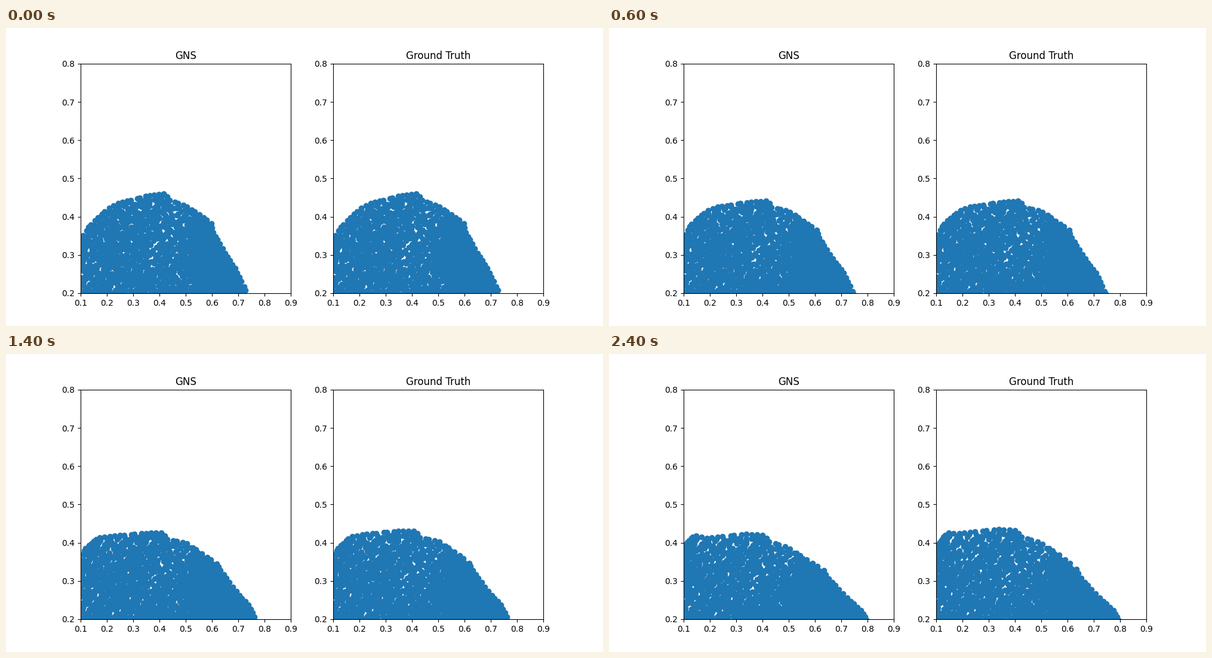
Animation of 1000x500 px, one loop 2.5 s. Source, as a matplotlib script:

```python
import numpy as np
import matplotlib.pyplot as plt
from matplotlib.animation import FuncAnimation
from matplotlib.collections import PolyCollection

BLUE = "#1f77b4"
FRAMES, STEP = 25, 100
FLOOR = 445
rng = np.random.default_rng(4)

# Key points of the surface, in stage pixels:
# x, y at rest, then total run, starting fall speed and total fall.
KEYS = np.array([
    (125, 355, -4, -4, -5),
    (140, 332, -14, -5, -11),
    (170, 303, -27, 21, 1),
    (189, 294, -24, 27, 15),
    (240, 281, -11, 51, 21),
    (268, 278, -7, 53, 26),
    (273, 289, -6, 53, 26),
    (301, 298, -1, 39, 27),
    (344, 327, 16, 50, 36),
    (346, 341, 20, 35, 34),
    (369, 381, 33, 43, 31),
    (384, 404, 39, 34, 27),
    (404, 446, 36, 34, 16)], float)


def key(x, col):
    return np.interp(x, KEYS[:, 0], KEYS[:, col])


def surface(gap=8, wobble=0.9):
    """Grains strung along the surface at nearly even distances."""
    seg = np.hypot(np.diff(KEYS[:, 0]), np.diff(KEYS[:, 1]))
    dist = np.append(0, np.cumsum(seg))
    s = np.arange(0, dist[-1], gap)
    s = np.sort(s + rng.normal(0, wobble, s.size))
    x = np.interp(s, dist, KEYS[:, 0])
    return np.column_stack([x, np.interp(s, dist, KEYS[:, 1])])


def filling(pitch=7):
    """Shaken hexagonal packing, looser along a slanted fault."""
    rows = np.arange(270, FLOOR + 12, pitch * np.sqrt(3) / 2)
    cols = np.arange(118, 318, pitch)
    x, y = np.meshgrid(cols, rows)
    x = x + (np.arange(rows.size) % 2)[:, None] * pitch / 2
    fault = np.exp(-((x - 282 + 0.6 * (y - 315)) / 18) ** 2) * (y < 390)
    shake = 1.2 + 0.8 * fault
    x = x + rng.normal(0, 1, x.shape) * shake
    y = y + rng.normal(0, 1, y.shape) * shake
    inside = y > key(x, 1) + 2
    return np.column_stack([x[inside], y[inside]])


rim = surface()
slope = rim[:, 0] > 308
grains = np.vstack([rim, filling()])
depth = np.clip((FLOOR - grains[:, 1]) / (FLOOR - key(grains[:, 0], 1)), 0, 1)
depth[:len(rim)] = 1


def move(u, true):
    """Grain positions at u (0 to 1): steady run, accelerated fall."""
    x, y = grains.T
    speed, fall = key(x, 3), key(x, 4)
    dy = speed * u + (fall - speed) * u * u
    if true:
        v = np.clip((u - 0.35) / 0.55, 0, 1)
        dy -= 8 * v * v * (3 - 2 * v) * np.interp(x, (150, 190, 325, 352),
                                                  (0, 1, 1, 0))
    return np.column_stack([x + key(x, 2) * u * depth, y + dy * depth])


def to_data(p):
    return np.column_stack([0.1 + (p[:, 0] - 125) * 0.8 / 352.27,
                            0.2 + (FLOOR - p[:, 1]) * 0.6 / 385])


fig, axes = plt.subplots(1, 2, figsize=(10, 5), dpi=100)
panels = []
for ax, title, true in zip(axes, ("GNS", "Ground Truth"), (False, True)):
    ax.set_title(title)
    ax.set_xlim(0.1, 0.9)
    ax.set_ylim(0.2, 0.8)
    core = PolyCollection([], facecolors=BLUE, edgecolors="none", zorder=0.8)
    ax.add_collection(core, autolim=False)
    dots = ax.scatter(*to_data(grains).T, color=BLUE, zorder=1)
    panels.append((true, core, dots))


def draw(i):
    for true, core, dots in panels:
        p = move(i / (FRAMES - 1), true)
        dots.set_offsets(to_data(p))
        edge = p[:len(rim)][slope]
        base = [(edge[-1, 0], 470), (edge[0, 0], 470)]
        core.set_verts([to_data(np.vstack([edge, base]))])
    return [a for panel in panels for a in panel[1:]]


anim = FuncAnimation(fig, draw, frames=FRAMES, interval=STEP,
                     init_func=lambda: draw(0), repeat=True, repeat_delay=0)
plt.show()
```
